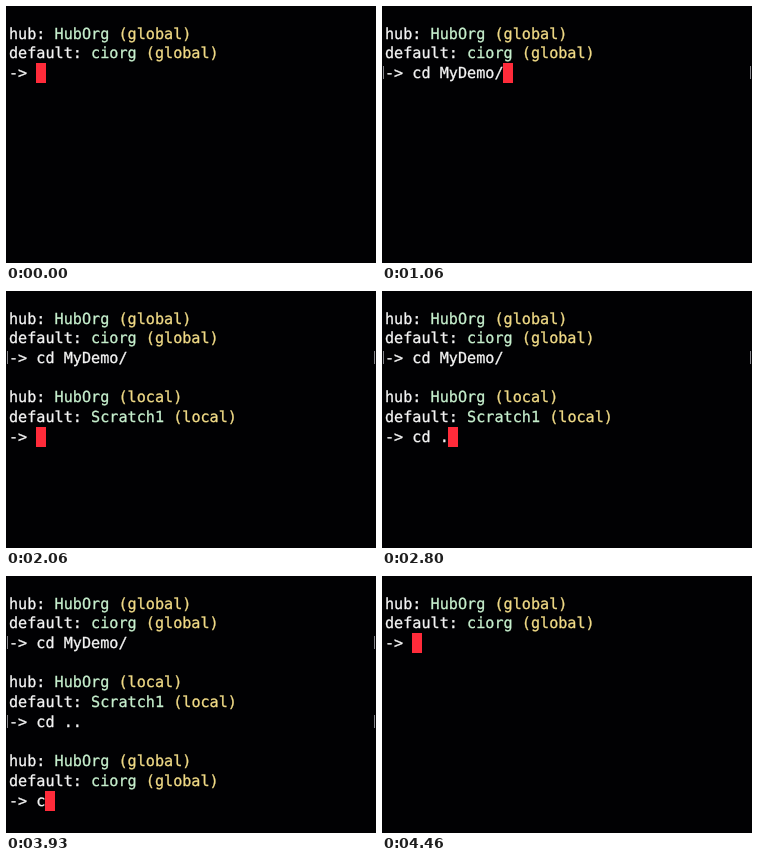
These frames come from a looping animation (370x257 px, 5.06 s). An HTML page:

```html
<!DOCTYPE html>
<html lang="en">
<head>
<meta charset="utf-8">
<title>Terminal session</title>
<style>
  html, body { margin: 0; width: 100%; height: 100%; overflow: hidden; background: #010103; }
  svg { display: block; width: 370px; height: 257px; }
  text {
    font: 15.15px "DejaVu Sans Mono", "Liberation Mono", monospace;
    white-space: pre;
    text-rendering: geometricPrecision;
    stroke-width: 0.3px;
  }
</style>
</head>
<body>
<svg id="stage" viewBox="0 0 370 257"></svg>
<script>
const LOOP = 5060;
const LEFT = 3, COL = 9.12, TOP = 17.8, ROW = 19.7;
const WHITE = "#f4f4f4", GREEN = "#c6efcd", YELLOW = "#f0da86", RED = "#ff2b3a", GRAY = "#85858a";
const stage = document.getElementById("stage");

// Each entry: time in ms, characters on the command line
const typing = {
  enterDir: [[200, "c"], [330, "cd"], [400, "cd "], [660, "cd M"], [800, "cd My"], [930, "cd MyDemo/"]],
  leaveDir: [[2330, "c"], [2400, "cd"], [2460, "cd "], [2800, "cd ."], [2930, "cd .."]],
  clear: [[3930, "c"], [4060, "cl"], [4130, "cle"], [4200, "clea"], [4330, "clear"]]
};

// show: status printed, enter: command sent, done: cursor leaves the line
const blocks = [
  { row: 0, show: 0, keys: typing.enterDir, enter: 1060, done: 1660, org: "ciorg", scope: "(global)" },
  { row: 4, show: 1660, keys: typing.leaveDir, enter: 3000, done: 3200, org: "Scratch1", scope: "(local)" },
  { row: 8, show: 3200, keys: typing.clear, enter: 4400, done: 4400, org: "ciorg", scope: "(global)" }
];
const CLEARED = 4460;

function add(tag, attrs, parent = stage) {
  const el = document.createElementNS("http://www.w3.org/2000/svg", tag);
  for (const key in attrs) el.setAttribute(key, attrs[key]);
  parent.appendChild(el);
  return el;
}

function write(parent, row, col, str, fill) {
  const el = add("text", { x: LEFT + col * COL, y: TOP + row * ROW + 14.7, fill, stroke: fill }, parent);
  el.textContent = str;
  return el;
}

function status(parent, row, label, name, scope) {
  write(parent, row, 0, label, WHITE);
  write(parent, row, label.length + 1, name, GREEN);
  write(parent, row, label.length + name.length + 2, scope, YELLOW);
}

function setVisible(el, on) {
  el.setAttribute("visibility", on ? "visible" : "hidden");
}

add("rect", { width: 370, height: 257, fill: "#010103" });
const cursor = add("rect", { width: 10, height: 20, fill: RED });

for (const b of blocks) {
  b.group = add("g", {});
  status(b.group, b.row, "hub:", "HubOrg", b.scope);
  status(b.group, b.row + 1, "default:", b.org, b.scope);
  write(b.group, b.row + 2, 0, "->", WHITE);
  b.command = write(b.group, b.row + 2, 3, "", WHITE);
  const y = Math.round(TOP + (b.row + 2) * ROW + 2.5);
  b.marks = add("path", { d: `M1.5 ${y}v13M368.5 ${y}v13`, stroke: GRAY, "stroke-width": 1 });
}

function draw(t) {
  const now = t >= CLEARED ? 0 : t;
  let row = 2, col = 3;
  for (const b of blocks) {
    const shown = now >= b.show;
    setVisible(b.group, shown);
    setVisible(b.marks, now >= b.enter);
    const typed = b.keys.filter(k => now >= k[0]).pop();
    const str = typed ? typed[1] : "";
    b.command.textContent = str;
    if (!shown) continue;
    const left = now >= b.done;
    row = b.row + (left ? 3 : 2);
    col = left ? 0 : 3 + str.length;
  }
  cursor.setAttribute("x", Math.floor(LEFT + col * COL));
  cursor.setAttribute("y", Math.round(TOP + row * ROW));
}

const start = performance.now();
function tick() {
  draw((performance.now() - start) % LOOP);
  requestAnimationFrame(tick);
}
draw(0);
requestAnimationFrame(tick);
</script>
</body>
</html>
```
